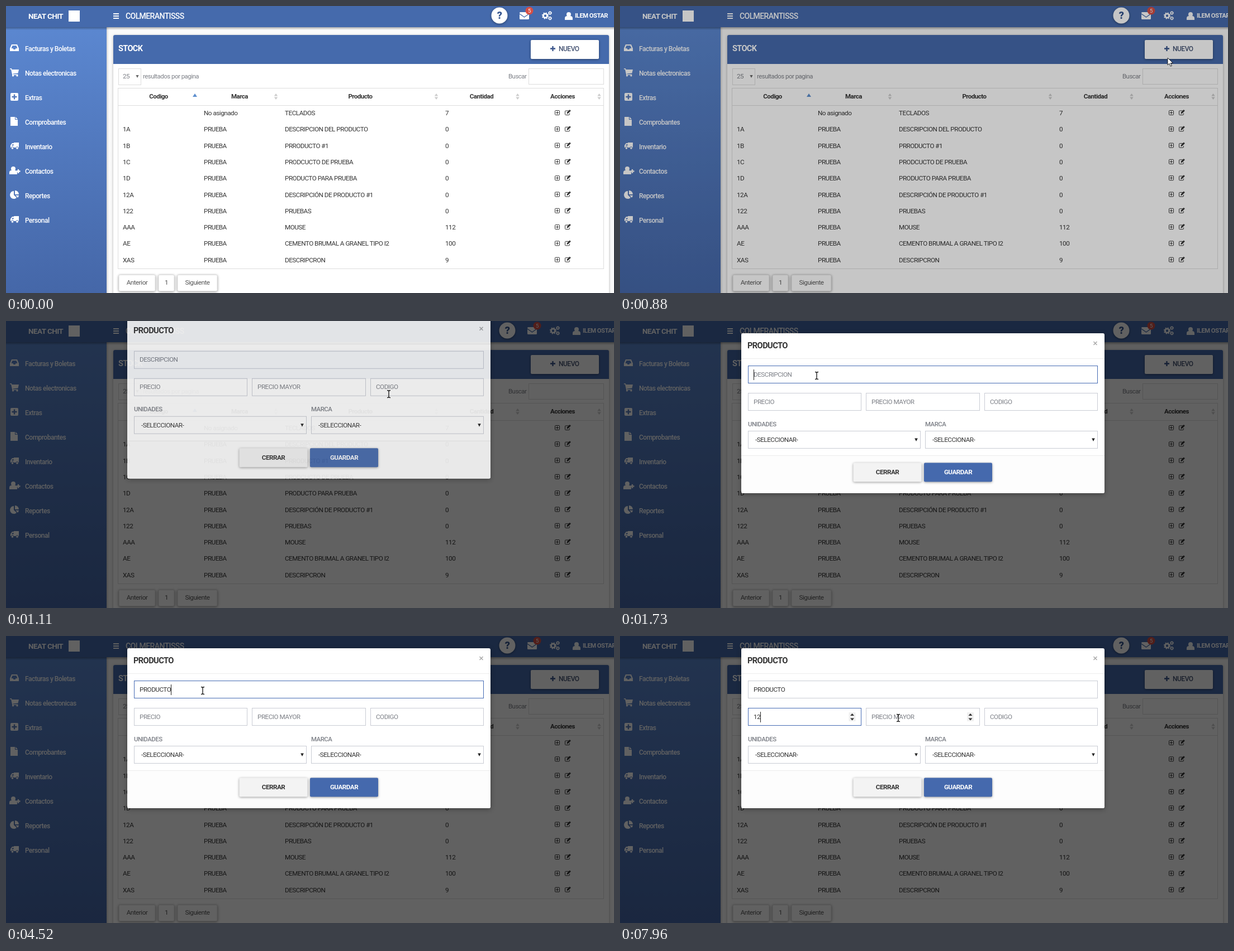
These frames come from a looping animation (1088 px wide and 515 px high, 8 s). An HTML page:

```html
<!DOCTYPE html>
<html lang="es">
<head>
<meta charset="utf-8">
<title>Stock</title>
<style>
html, body { margin: 0; width: 100%; height: 100%; overflow: hidden; background: #fafafa; }
svg { display: block; width: 1088px; height: 515px; }
text { font-family: Roboto, "Open Sans", sans-serif; letter-spacing: -.042em; white-space: pre; }
.lift { filter: drop-shadow(0 1px 2px rgba(0,0,0,.4)); }
</style>
</head>
<body>
<svg id="stage" viewBox="0 0 1088 515" xmlns="http://www.w3.org/2000/svg"></svg>
<script>
const LOOP = 8000;
const BLUE = '#456aac', INK = '#333', GREY = '#7c7f86', LINE = '#ddd';
const stage = document.getElementById('stage');

const text = (x, y, s, o = {}) =>
  `<text x="${x}" y="${y}" font-size="${o.size || 11.7}" font-weight="${o.weight || 400}" fill="${o.fill || INK}" text-anchor="${o.mid ? 'middle' : 'start'}"${o.id ? ` id="${o.id}"` : ''}>${s}</text>`;
const rect = (x, y, w, h, fill, extra = '') =>
  `<rect x="${x}" y="${y}" width="${w}" height="${h}" fill="${fill}" ${extra}/>`;
const box = (x, y, w, h, stroke = LINE, extra = '') =>
  rect(x + .5, y + .5, w - 1, h - 1, '#fff', `stroke="${stroke}" ${extra}`);
const path = (d, fill, extra = '') => `<path d="${d}" fill="${fill}" ${extra}/>`;
const group = (x, y, body, extra = '') => `<g transform="translate(${x} ${y})" ${extra}>${body}</g>`;
const tri = (x, y, w, h, fill) => path(`M${x - w} ${y}h${2 * w}l${-w} ${h}z`, fill);

// Icons, each centred on 0,0
const white = '#fff';
const truck = path('M-1 -6h9v9h-9zM-7 3v-4l3-4h3v8z', white) + path('M-5 -.5l2-2.5h1.5v2.5z', '#5579bc') +
  `<g fill="#fff" stroke="#5075b8"><circle cx="-3.5" cy="4" r="2.3"/><circle cx="5" cy="4" r="2.3"/></g>`;
const person = path('M-7 7v-3q0-4 4-4h6q4 0 4 4v3z', white) + `<circle cy="-3" r="4" fill="#fff"/>`;
const icons = [
  path('M-5 -6h10l3 7v5h-16v-5zM-3.5 -4l-2 5h3l1 2h3l1-2h3l-2-5z', white, 'fill-rule="evenodd"'),
  path('M-8 -7h3l.6 2h12.4l-1.5 6.5l-9 1l.3 1h8.5v1.5h-10l-2.3-10.5h-2z', white) +
    '<g fill="#fff"><circle cx="-2.5" cy="6" r="1.6"/><circle cx="5" cy="6" r="1.6"/></g>',
  rect(-7, -7, 14, 14, white, 'rx="2"') + path('M-4.5 0h9M0 -4.5v9', 'none', 'stroke="#5579bc" stroke-width="2.4"'),
  path('M-7 -8h8v5h5v11h-13zM2 -8l4 4h-4z', white),
  truck,
  group(-2, 0, person) + path('M3.5 1.5h7M7 -2v7', 'none', 'stroke="#fff" stroke-width="2.4"'),
  path('M-1 -7a7 7 0 1 0 5 12l-5-5z', white) + path('M1 -8a7 7 0 0 1 7 7h-7z', white) + path('M2 .8h6a7 7 0 0 1-2 4.2z', white),
  truck
];
const gear = (x, y, r) => `<circle cx="${x}" cy="${y}" r="${r}" fill="none" stroke="#fff" stroke-width="${r * .75}"/>` +
  `<circle cx="${x}" cy="${y}" r="${r * 1.5}" fill="none" stroke="#fff" stroke-width="${r * .5}" stroke-dasharray="${r * .59}"/>`;

const menu = ['Facturas y Boletas', 'Notas electronicas', 'Extras', 'Comprobantes', 'Inventario', 'Contactos', 'Reportes', 'Personal'];
const rows = [
  ['', 'No asignado', 'TECLADOS', 7],
  ['1A', 'PRUEBA', 'DESCRIPCION DEL PRODUCTO', 0],
  ['1B', 'PRUEBA', 'PRRODUCTO #1', 0],
  ['1C', 'PRUEBA', 'PRODCUCTO DE PRUEBA', 0],
  ['1D', 'PRUEBA', 'PRODUCTO PARA PRUEBA', 0],
  ['12A', 'PRUEBA', 'DESCRIPCIÓN DE PRODUCTO #1', 0],
  ['122', 'PRUEBA', 'PRUEBAS', 0],
  ['AAA', 'PRUEBA', 'MOUSE', 112],
  ['AE', 'PRUEBA', 'CEMENTO BRUMAL A GRANEL TIPO I2', 100],
  ['XAS', 'PRUEBA', 'DESCRIPCRON', 9]
];
const colX = [209, 354, 499, 786];
const heads = [['Codigo', 273], ['Marca', 418], ['Producto', 634], ['Cantidad', 851], ['Acciones', 996]];

const actions = y => group(986.5, y, rect(-4, -4, 8, 8, 'none', 'rx="1" stroke="#333"') + path('M-2.5 0h5M0 -2.5v5', 'none', 'stroke="#333"')) +
  group(1005, y, path('M2.5 -3.5h-6q-1 0-1 1v5.500q0 1 1 1h6q1 0 1-1v-2', 'none', 'stroke="#333"') +
    path('M-1.5 1.700l.3-2.200l5-5l2 2l-5 5z', INK));
const tag = (x, w, s) => rect(x, 482.5, w, 29, '#fff', 'rx="2" stroke="#ddd" class="lift"') +
  text(x + w / 2, 500, s, { mid: 1, fill: '#555' });

function page() {
  let s = rect(0, 0, 1088, 515, '#fafafa');
  s += rect(192, 52, 887, 480, '#fff', 'rx="3" style="filter:drop-shadow(0 1px 2px rgba(0,0,0,.3))"');
  s += path('M192 104v-49q0-3 3-3h881q3 0 3 3v49z', BLUE);
  s += text(201, 81, 'STOCK', { size: 14.5, weight: 700, fill: white });
  s += rect(939, 61, 122, 34, '#fff', 'rx="2" class="lift"');
  s += path('M974 76.500h9M978.500 72v9', 'none', 'stroke="#3b568c" stroke-width="2.4"');
  s += text(989, 81, 'NUEVO', { size: 12, weight: 500, fill: '#435272' });
  s += box(201, 112, 41, 30) + text(209, 130, '25', { fill: GREY }) + tri(235, 124, 2.6, 5, '#666');
  s += text(245, 130, 'resultados por pagina', { size: 11.4, fill: GREY });
  s += text(899, 130, 'Buscar', { size: 11.4, fill: GREY }) + box(935, 112, 135, 29);
  s += box(200, 147, 870, 325) + rect(201, 178, 868, 1, LINE);
  heads.forEach(h => s += text(h[1], 165.5, h[0], { size: 11.5, weight: 700, mid: 1 }));
  s += tri(338, 163, 4, -6, '#5d8fce');
  [483, 770, 915.5, 1061.5].forEach(x => s += tri(x, 161.5, 3.2, -4.5, '#ccc') + tri(x, 163.5, 3.2, 4.5, '#ccc'));
  rows.forEach((r, i) => {
    const y = 192 + i * 29.3;
    r.forEach((v, c) => s += text(colX[c], (y + 4).toFixed(1), v));
    s += actions(y - .5);
  });
  s += tag(202, 65, 'Anterior') + tag(273, 28, '1') + tag(307, 71, 'Siguiente');

  s += rect(0, 38, 180, 477, 'url(#side)');
  s += rect(180, 38, 4, 477, 'url(#edge)');
  menu.forEach((m, i) => {
    s += group(15, 75 + i * 44, icons[i]);
    s += text(34, 80.500 + i * 44, m, { size: 12, weight: 500, fill: white });
  });

  s += rect(0, 38, 1088, 5, 'url(#fall)') + rect(0, 0, 1088, 38, BLUE);
  s += text(40, 23, 'NEAT CHIT', { size: 13.5, weight: 700, fill: white }) + rect(112, 8, 20, 20, white);
  s += path('M192 14h10M192 18h10M192 22h10', 'none', 'stroke="#fff" stroke-width="1.8"');
  s += text(214, 23, 'COLMERANTISSS', { size: 14, weight: 500, fill: white });
  s += '<g id="tools">' +
    '<circle cx="883" cy="17" r="14.5" fill="#fff" class="lift"/>' +
    text(883, 23, '?', { size: 18, weight: 900, mid: 1, fill: '#34548f' }) +
    rect(919, 11, 17, 13, white, 'rx="1.5"') + path('M919 14l8.500 6l8.500-6', 'none', `stroke="${BLUE}" stroke-width="1.4"`) +
    '<circle cx="936.500" cy="8.500" r="7" fill="#d64f45"/>' + text(936.5, 12, '5', { size: 9.5, mid: 1, fill: white }) +
    gear(965, 17.5, 3.5) + gear(973.5, 12.5, 2) + gear(973.5, 22, 2) +
    group(1007, 18, person, 'opacity=".97"') +
    text(1018, 21, 'ILEM OSTAR', { size: 11.2, weight: 700, fill: white }) + '</g>';
  return s;
}

const EDGE = [201, 204, 212], FOCUS = [70, 107, 180];
const fields = [[229, 80, 626], [229, 129, 203], [440, 129, 204], [652, 129, 203]];
const hints = ['DESCRIPCION', 'PRECIO', 'PRECIO MAYOR', 'CODIGO'];

const select = (x, label) => text(x, 188.5, label, { size: 11.4, fill: GREY, weight: 500 }) +
  box(x, 197, 309, 32, '#c9ccd4') + text(x + 13, 217, '-SELECCIONAR-') + tri(x + 301, 210.5, 2.8, 5.5, '#222');
const button = (x, w, fill, s, ink) => rect(x, 254.5, w, 34, fill, 'rx="2" class="lift"') +
  text(x + w / 2, 275, s, { weight: 700, mid: 1, fill: ink });
const spinner = (x, id) => `<g id="${id}">` + rect(x - 6, 137, 12, 16, '#f0f0f0') +
  tri(x, 143, 3.5, -4, '#333') + tri(x, 147.5, 3.5, 4, '#333') + '</g>';

function dialog() {
  let s = rect(217, 22, 650, 287, '#fff', 'rx="3" style="filter:drop-shadow(0 2px 4px rgba(0,0,0,.35))"');
  s += path('M217 242h650v64q0 3-3 3h-644q-3 0-3-3z', '#fdfdfd');
  s += text(228, 48.5, 'PRODUCTO', { size: 14.7, weight: 700 });
  s += path('M847.500 37l6 6M853.500 37l-6 6', 'none', 'stroke="#aaa" stroke-width="1.6"');
  s += rect(217, 67, 650, 1, '#ececec') + rect(217, 241, 650, 1, '#ececec');
  fields.forEach((f, i) => {
    s += rect(f[0] + .5, f[1] + .5, f[2] - 1, 31, '#fff', `id="field${i}" stroke="#c9ccd4"`);
    s += text(f[0] + 10, f[1] + 19.5, hints[i], { id: 'val' + i, fill: GREY });
  });
  s += path('', 'none', 'id="wave" stroke="#e0332e"');
  s += rect(0, 0, 1, 19, '#222', 'id="caret"');
  s += spinner(415.5, 'spin1') + spinner(627, 'spin2');
  s += select(229, 'UNIDADES') + select(546, 'MARCA');
  s += button(417.5, 122, '#f3f3f3', 'CERRAR', INK) + button(544, 122, '#4569ad', 'GUARDAR', white);
  return s;
}

const fade = (id, x2, y2, a, b) =>
  `<linearGradient id="${id}" x2="${x2}" y2="${y2}"><stop stop-color="${a}"/><stop offset="1" stop-color="${b}"/></linearGradient>`;
stage.innerHTML = '<defs>' + fade('side', 0, 1, '#5b87d0', '#4567a8') +
  fade('fall', 0, 1, 'rgba(0,0,0,.3)', 'rgba(0,0,0,0)') + fade('edge', 1, 0, 'rgba(0,0,0,.15)', 'rgba(0,0,0,0)') + '</defs>' +
  page() + rect(0, 0, 1088, 515, '#000', 'id="shade"') + `<g id="dialog">${dialog()}</g>` +
  '<g id="mouse">' +
  path('M0 0v13l3-2.800l2.200 5l2.200-1l-2.200-4.700h4.300z', '#fff', 'id="arrow" stroke="#111" stroke-width=".9"') +
  path('M-3 -6.500q3 0 3 1.500q0-1.500 3-1.500M0 -5v10M-3 6.500q3 0 3-1.500q0 1.500 3 1.500', 'none', 'id="beam" stroke="#111" stroke-width="1.300"') +
  '</g>';

const el = {};
stage.querySelectorAll('[id]').forEach(n => el[n.id] = n);
const show = (n, on) => n.style.display = on ? '' : 'none';
const clamp = v => Math.max(0, Math.min(1, v));
const ramp = (t, a, b) => clamp((t - a) / (b - a));
const between = (t, a, b) => t >= a && t < b;

// CSS ease-out, cubic-bezier(0, 0, .58, 1)
function easeOut(p) {
  let lo = 0, hi = 1;
  for (let i = 0; i < 20; i++) {
    const u = (lo + hi) / 2;
    if (3 * .58 * (1 - u) * u * u + u ** 3 < p) lo = u; else hi = u;
  }
  return 3 * (1 - lo) * lo * lo + lo ** 3;
}

// Pointer path: time, x, y
const track = [
  [120, 209, 454], [660, 980, 93], [965, 980, 93], [1110, 685, 131], [1580, 352, 98],
  [5080, 352, 98], [5700, 325, 130], [7500, 325, 130], [7720, 420, 165], [7950, 498, 147], [8000, 498, 147]
];
function pointer(t) {
  let i = 0;
  while (i < track.length - 2 && t >= track[i + 1][0]) i++;
  const [a, x, y] = track[i], [b, u, v] = track[i + 1];
  const p = ramp(t, a, b), k = p * p * (3 - 2 * p);
  return [x + (u - x) * k, y + (v - y) * k];
}

const keys = [
  [0, ''], [2430, 'P'], [2600, 'PR'], [2830, 'PRO'], [2900, 'PROD'], [3130, 'PRODU'], [3200, 'PRODUC'],
  [3280, 'PRODUCV'], [3830, 'PRODUC'], [4060, 'PRODUCT'], [4290, 'PRODUCTP'], [4370, 'PRODUCT'], [4520, 'PRODUCTO']
];
const price = [[0, ''], [7420, '1'], [7500, '12']];
const typed = (list, t) => list.filter(k => k[0] <= t).pop()[1];
const dark = [[2130, 2430], [5080, 5580], [6630, 7180]];

function setValue(i, value) {
  const n = el['val' + i], s = value || hints[i];
  if (n.textContent !== s) n.textContent = s;
  n.setAttribute('fill', value ? INK : GREY);
  return value ? n.getComputedTextLength() : 0;
}
function setEdge(i, k) {
  el['field' + i].setAttribute('stroke', `rgb(${EDGE.map((v, c) => Math.round(v + (FOCUS[c] - v) * k))})`);
}

function draw(t) {
  el.tools.setAttribute('transform', `translate(${t >= 810 ? 14 : 0} 0)`);
  el.shade.setAttribute('opacity', Math.min(.62, Math.max(0, (t - 817) * .0035)));

  const dy = t < 980 ? -68 : -68 * (1 - easeOut(ramp(t, 980, 1280)));
  el.dialog.setAttribute('transform', `translate(0 ${dy.toFixed(2)})`);
  el.dialog.setAttribute('opacity', ramp(t, 980, 1130));
  show(el.dialog, t > 980);

  const widths = [setValue(0, typed(keys, t)), setValue(1, typed(price, t))];
  setEdge(0, ramp(t, 1610, 1730) - ramp(t, 6060, 6250));
  setEdge(1, ramp(t, 6060, 6250));

  const active = t < 6100 ? 0 : 1;
  el.caret.setAttribute('x', Math.round(239 + widths[active]));
  el.caret.setAttribute('y', active ? 136 : 87);
  show(el.caret, t >= 1650 && !dark.some(d => between(t, d[0], d[1])));

  const bad = between(t, 3280, 3830) || between(t, 4290, 4370);
  show(el.wave, bad);
  if (bad) el.wave.setAttribute('d', 'M239 103' + 'l2 -2l2 2'.repeat(Math.round(widths[0] / 4)));

  const [x, y] = pointer(t);
  const over = t > 980 ? fields.findIndex(f => x >= f[0] && x <= f[0] + f[2] && y >= f[1] + dy && y <= f[1] + dy + 32) : -1;
  el.mouse.setAttribute('transform', `translate(${x.toFixed(2)} ${y.toFixed(2)})`);
  show(el.mouse, t >= 120);
  show(el.beam, over >= 0);
  show(el.arrow, over < 0);
  show(el.spin1, over === 1 || active === 1);
  show(el.spin2, over === 2);
}

const start = performance.now();
function tick() {
  draw((performance.now() - start) % LOOP);
  requestAnimationFrame(tick);
}
tick();
</script>
</body>
</html>
```
